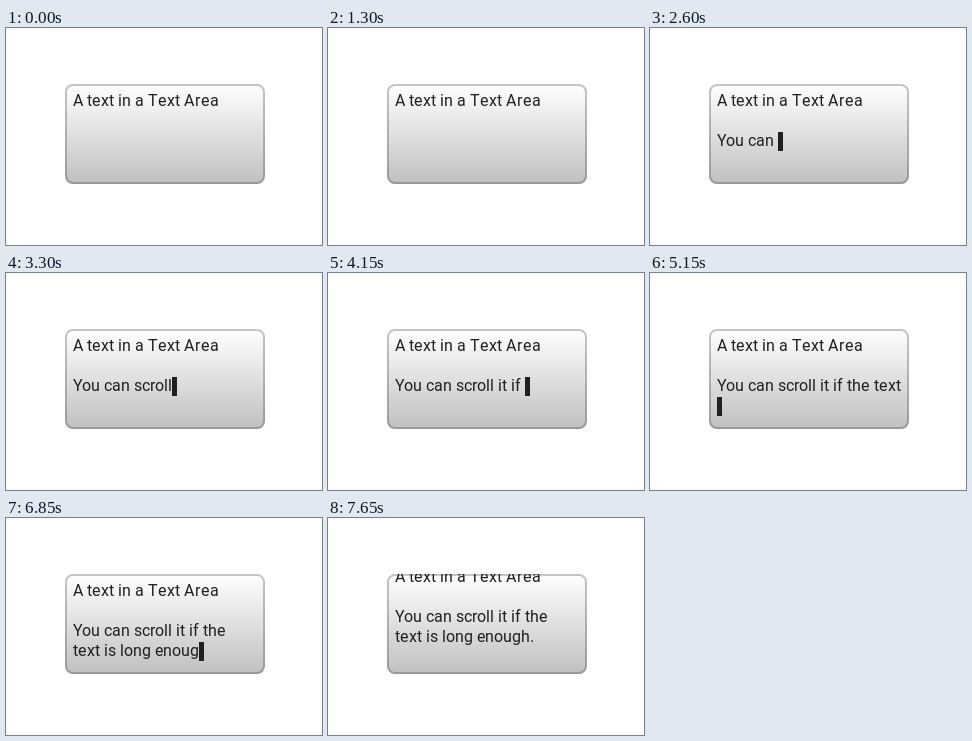
Recreate the animation shown at these times as an HTML page. Size 316 by 217 pixels, loop 8000 ms.

```html
<!DOCTYPE html>
<html lang="en">
<head>
<meta charset="utf-8">
<title>Text area</title>
<style>
  html, body { margin: 0; width: 100%; height: 100%; overflow: hidden; background: #fff; }
  svg { display: block; width: 316px; height: 217px; }
  text { font: 16px Roboto, sans-serif; fill: #202020; white-space: pre; }
</style>
</head>
<body>
<svg viewBox="0 0 316 217">
  <defs>
    <linearGradient id="shade" x1="0" y1="0" x2="0" y2="1">
      <stop offset="0" stop-color="#fff"/>
      <stop offset="1" stop-color="#c0c0c0"/>
    </linearGradient>
    <clipPath id="panel"><rect x="59" y="56" width="200" height="100"/></clipPath>
  </defs>
  <rect x="59" y="56" width="200" height="100" rx="8" fill="url(#shade)"/>
  <rect x="60" y="57" width="198" height="98" rx="7" fill="none" stroke="#404040" stroke-width="2" stroke-opacity=".3"/>
  <g clip-path="url(#panel)">
    <g id="content">
      <rect id="cursor" width="5" height="19" fill="#202020"/>
    </g>
  </g>
</svg>
<script>
const LOOP = 8000, LEFT = 67, TOP = 64, WIDTH = 184, VIEW = 85, PITCH = 20, BASE = 14;
const START = 'A text in a Text Area';
const TYPED = '\n\nYou can scroll it if the text is long enough.\n';
const KERN = { Yo: -1, en: -1, ro: -1, 'A ': -1 };

const content = document.getElementById('content');
const cursor = document.getElementById('cursor');
const rows = Array.from({ length: 5 }, (_, i) => {
  const row = document.createElementNS('http://www.w3.org/2000/svg', 'text');
  row.setAttribute('y', TOP + i * PITCH + BASE);
  content.insertBefore(row, cursor);
  return row;
});

// Whole-pixel advances, measured large to avoid hinting
const pen = document.createElement('canvas').getContext('2d');
pen.font = '2048px Roboto, sans-serif';
const widths = {};
const advance = (c, next) =>
  (widths[c] ??= Math.round(pen.measureText(c).width / 128 + 0.1)) + (KERN[c + next] || 0);

// Pen positions before each letter, plus the end position
function offsets(str) {
  const xs = [0];
  for (let i = 0; i < str.length; i++) xs.push(xs[i] + advance(str[i], str[i + 1]));
  return xs;
}
const measure = str => offsets(str).at(-1);

function wrap(str) {
  const lines = [''];
  for (const word of str.match(/\n|\S+ ?/g)) {
    const last = lines.length - 1;
    if (word === '\n') lines.push('');
    else if (lines[last] && measure(lines[last] + word) > WIDTH) lines.push(word);
    else lines[last] += word;
  }
  return lines;
}

// Moment the k-th letter appears, on a 50 ms tick
const typeTime = k => Math.floor((2350 + (k - 8) * 122.3 - (k < 8 ? 10 : 0)) / 50) * 50;
const times = Array.from(TYPED, (_, i) => typeTime(i + 1));
const END = times.at(-1);

function cursorOn(t) {
  if (t < times[0]) return (t >= 50 && t < 500) || (t >= 850 && t < 1300);
  return t < END + 450;
}

let shown = -1;
function layout(count) {
  const lines = wrap(START + TYPED.slice(0, count));
  rows.forEach((row, i) => {
    const line = lines[i] || '';
    row.textContent = line;
    row.setAttribute('x', offsets(line).slice(0, line.length || 1).map(x => LEFT + x).join(' '));
  });
  let line = lines.length - 1, x = measure(lines[line]);
  if (x + 4 > WIDTH) { x = 0; line++; }
  cursor.setAttribute('x', LEFT + x);
  cursor.setAttribute('y', TOP + line * PITCH);
  const scroll = Math.max(0, lines.length * PITCH - 1 - VIEW);
  content.setAttribute('transform', `translate(0 ${-scroll})`);
  shown = count;
}

function draw(t) {
  const count = times.filter(at => at <= t).length;
  if (count !== shown) layout(count);
  cursor.setAttribute('visibility', cursorOn(t) ? 'visible' : 'hidden');
}

const begin = performance.now();
function tick() {
  draw((performance.now() - begin) % LOOP);
  requestAnimationFrame(tick);
}
tick();
</script>
</body>
</html>
```
